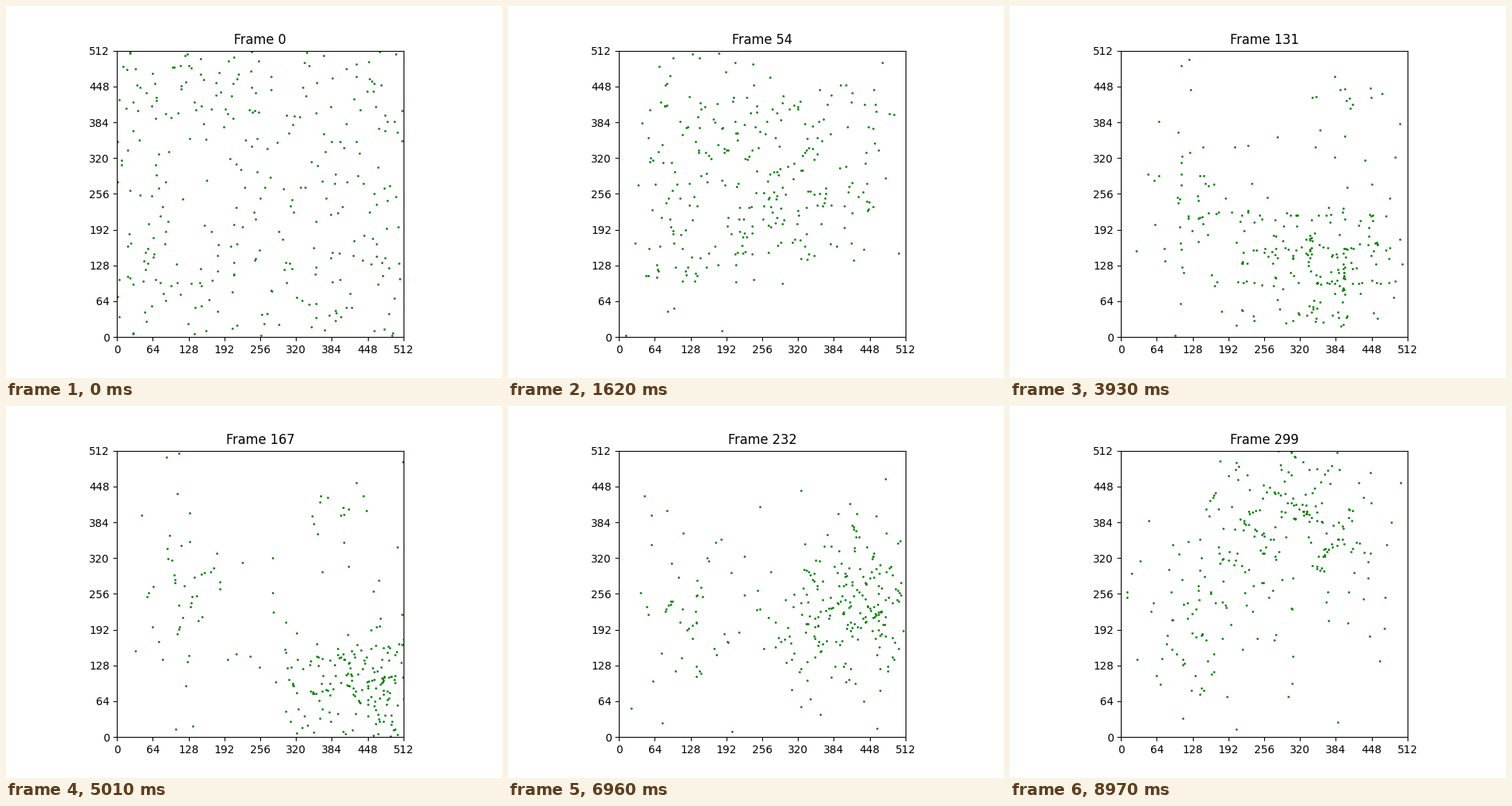
Animation of 640 by 480 pixels, one loop 9 s. Source, as a matplotlib script:

```python
import numpy as np
import matplotlib.pyplot as plt
from matplotlib.animation import FuncAnimation

SIZE = 512
BOIDS = 300
FRAMES = 300
GATHER = 85  # frames until the scattered boids have joined their flocks

# time, x, y, spread of the main flock
ROUTE = np.array([
    (0, 250, 300, 85), (54, 250, 305, 78), (89, 245, 245, 58),
    (131, 350, 125, 68), (204, 475, 125, 52), (259, 335, 325, 76),
    (299, 285, 385, 84),
], float)
TIMES, POSES = ROUTE[:, 0], ROUTE[:, 1:]
SLOPES = np.gradient(POSES, TIMES, axis=0)

rng = np.random.default_rng(12)
start = rng.uniform(0, SIZE, (BOIDS, 2))
drift = rng.normal(0, 1, (BOIDS, 2))
size = np.exp(rng.normal(0, 0.35, (BOIDS, 1)))
jitter = rng.normal(0, 0.25, (BOIDS, 2))

# Small side flocks form on the left and at the upper right.
chance = rng.random(BOIDS)
left = (start[:, 0] < 150) & (chance < 0.55)
right = (start[:, 0] > 340) & (start[:, 1] > 256) & (chance < 0.5)
main = ~(left | right)


def smooth(u):
    u = np.clip(u, 0, 1)
    return u * u * (3 - 2 * u)


def main_pose(t):
    """Centre and spread of the main flock on a cubic Hermite path."""
    k = min(np.searchsorted(TIMES, t, side="right") - 1, len(TIMES) - 2)
    h = TIMES[k + 1] - TIMES[k]
    u = (t - TIMES[k]) / h
    x, y, spread = (POSES[k] + (POSES[k + 1] - POSES[k]) * smooth(u)
                    + u * (1 - u) ** 2 * h * SLOPES[k]
                    + u * u * (u - 1) * h * SLOPES[k + 1])
    return (x, y), spread


def left_pose(t):
    return (115, 215 + 50 * np.sin(t / 48 - 2)), np.array([45, 88])


def right_pose(t):
    return (410, 365 + 40 * np.sin(t / 48 - 1)), 50


def shape(members):
    """Map the members' starting places onto a round, dense-centred flock."""
    p = start[members]
    u = np.clip((p - p.mean(0)) / p.std(0) / 1.75, -1, 1)
    disc = u * np.sqrt(1 - u[:, ::-1] ** 2 / 2)
    r = np.hypot(*disc.T)[:, None]
    return disc * (1 + 1.2 * r) * size[members] + jitter[members]


FLOCKS = [(m, shape(m), pose) for m, pose in
          [(main, main_pose), (left, left_pose), (right, right_pose)]]


def positions(t):
    goal = np.empty_like(start)
    turn = 0.006 * t
    c, s = np.cos(turn), np.sin(turn)
    for members, form, pose in FLOCKS:
        centre, spread = pose(t)
        # A slow wave through the flock bunches it into strands.
        wave = 0.25 * np.sin(5 * form[:, ::-1] + np.array([0.03, 0.04]) * t)
        goal[members] = centre + spread * ((form + wave) @ [[c, s], [-s, c]])
    e = smooth(t / GATHER)
    return (1 - e) * (start + drift * t) + e * goal


fig, ax = plt.subplots(figsize=(6.4, 4.8), dpi=100)
ax.set_aspect("equal")
ax.set(xlim=(0, SIZE), ylim=(0, SIZE))
ax.set_xticks(range(0, SIZE + 1, 64))
ax.set_yticks(range(0, SIZE + 1, 64))
title = ax.set_title("Frame 0")
dots, = ax.plot([], [], "o", color="g", markersize=1)


def update(i):
    dots.set_data(*positions(i).T)
    title.set_text(f"Frame {i}")
    return dots, title


anim = FuncAnimation(fig, update, frames=FRAMES, interval=30, repeat=True,
                     repeat_delay=0, blit=False)
plt.show()
```
